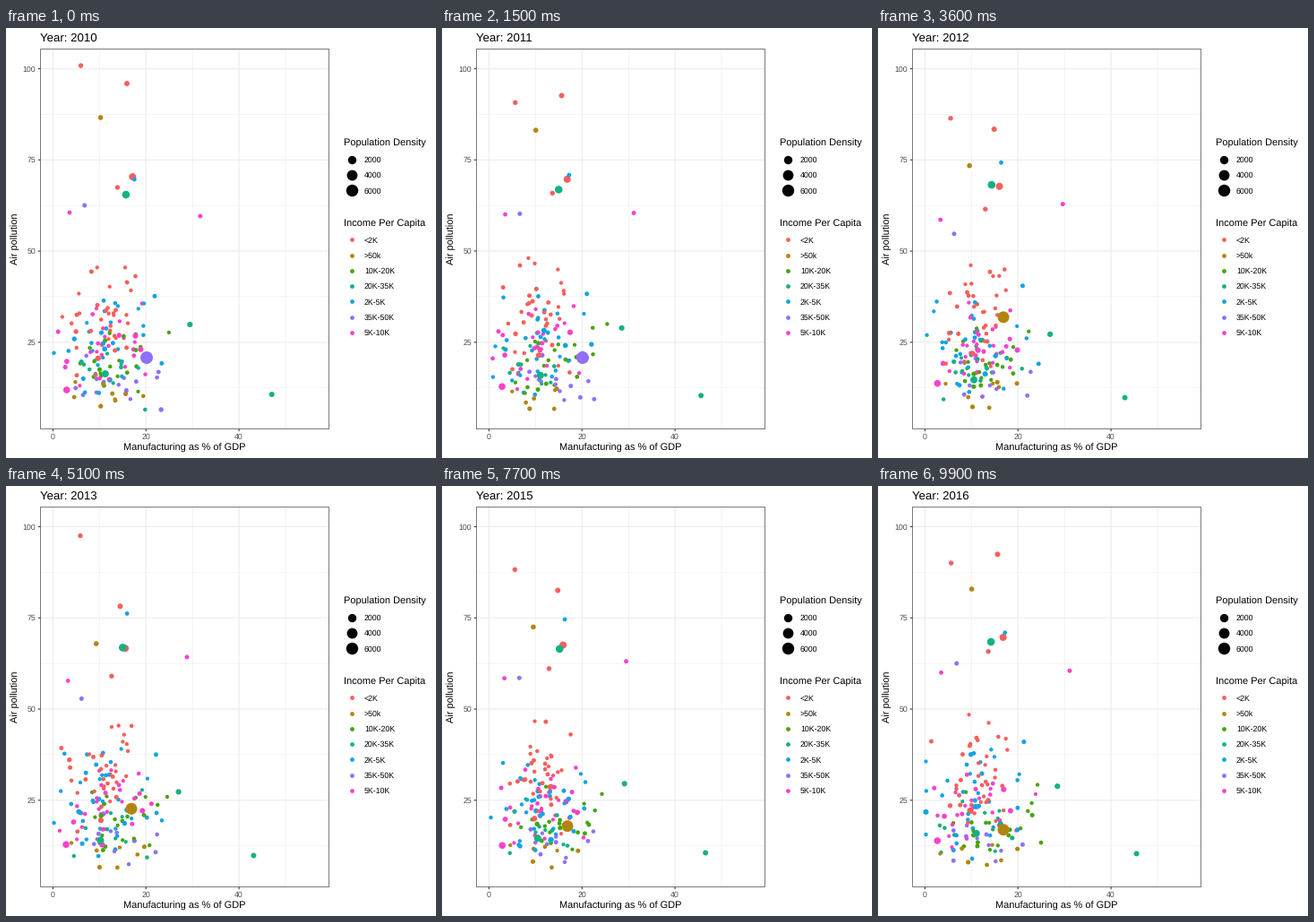
Write a matplotlib script that moves like this. It is 480 px wide and 480 px high and loops after 10000 ms.

```python
import numpy as np
import matplotlib.pyplot as plt
from matplotlib.animation import FuncAnimation
from matplotlib.patches import Rectangle

plt.rcParams.update({"font.family": "Liberation Sans",
                     "text.hinting": "none", "path.snap": False})

SIZE, DPI, FRAMES, YEARS = 480, 72, 100, 7
KEYS = np.round(np.linspace(0, FRAMES - 1, YEARS))
K = np.arange(YEARS)

COLORS = {
    "<2K": "#F4605C", ">50k": "#B38510", "10K-20K": "#43A607",
    "20K-35K": "#14B184", "2K-5K": "#12A3E4", "35K-50K": "#8F70FA",
    "5K-10K": "#F742CB",
}
RED, GOLD, GREEN, TEAL, BLUE, PURPLE, PINK = COLORS.values()

# Standout countries: color, radius, x, y, vertical swing, period in years
STANDOUTS = [
    (RED, 2.7, 82, 78, -36, 3.5), (RED, 3.0, 131, 100, -38, 7),
    (RED, 4.0, 137, 174, -8, 7), (RED, 2.7, 121, 196, -18, 7),
    (TEAL, 4.3, 130, 180, 6, 4), (TEAL, 3.0, 285, 411, -2, 5),
    (TEAL, 3.1, 198, 337, -6, 5), (TEAL, 4.0, 108, 391, -5, 7),
    (PINK, 2.5, 209, 200, 10, 7), (PINK, 3.8, 67, 400, 4, 4),
    (PINK, 2.4, 70, 212, -6, 7), (BLUE, 2.4, 139, 155, 14, 7),
    (GOLD, 2.8, 103, 140, -40, 7), (PURPLE, 2.5, 86, 218, -20, 6),
]

# Crowd per group: color, count, mean x, mean y, spread x, spread y
CROWD = [
    (RED, 39, 102, 323, 22, 36), (GOLD, 9, 117, 411, 25, 9),
    (GREEN, 25, 127, 374, 33, 20), (TEAL, 14, 112, 383, 27, 20),
    (BLUE, 37, 114, 350, 36, 33), (PURPLE, 15, 123, 396, 27, 17),
    (PINK, 31, 113, 354, 34, 23),
]

rng = np.random.default_rng(12)
rows = []  # color, radius, yearly positions, yearly presence


def noise(*shape):
    return np.clip(rng.normal(size=shape), -1.7, 1.7)


def add(color, radius, path, alive=True):
    path = np.broadcast_to(path, (YEARS, 2))
    rows.append((color, radius, path, np.broadcast_to(alive, YEARS)))


for color, n, x, y, sx, sy in CROWD:
    counts = n - rng.integers(0, 4, YEARS)
    for i in range(n):
        home = [x, y] + [sx, sy] * noise(2)
        moved = [x, y] + [sx, sy] * noise(YEARS, 2)
        swap = rng.random((YEARS, 1)) < 0.25
        path = np.where(swap, moved, home) + [3, 6] * noise(YEARS, 2)
        path = np.clip(path, [53.5, 240], [190, 426])
        add(color, min(2.1 + rng.exponential(0.22), 3.1), path, i < counts)
rows = [rows[i] for i in rng.permutation(len(rows))]

for color, radius, x, y, swing, period in STANDOUTS:
    wave = np.cos(2 * np.pi * K / period)
    sway = 0.05 * (x - 52)
    add(color, radius, np.column_stack([x + sway * wave, y + swing * wave]))

# The densest country changes income group between 2011 and 2012
settle = 385 - 70 * np.exp(-(K - 2))
add(PURPLE, 7, [157, 368], K < 2)
add(GOLD, 6.5, np.column_stack([np.full(YEARS, 140), settle]), K >= 2)

colors, radii, paths, alive = zip(*rows)
paths, alive = np.stack(paths, 1), np.stack(alive, 1)

fig = plt.figure(figsize=(SIZE / DPI, SIZE / DPI), dpi=DPI, facecolor="white")
ax = fig.add_axes([0, 0, 1, 1])
ax.set(xlim=(0, SIZE), ylim=(SIZE, 0))
ax.axis("off")

LEFT, RIGHT, TOP, BOTTOM = 38.5, 360.5, 23.5, 447.5


def px(v):
    return 52.4 + 5.193 * v


def py(v):
    return 350.8 - 4.072 * (v - 25)


def line(x, y, color="#EBEBEB", lw=1.07):
    ax.plot(x, y, color=color, lw=lw, zorder=1, solid_capstyle="butt")


def text(x, y, s, size=8.8, color="black", **kw):
    return ax.text(x, y, s, size=size, color=color, **kw)


def dots(x, y, radius, color, **kw):
    return ax.scatter(x, y, s=4 * np.square(radius), c=color,
                      linewidths=0, **kw)


for v in (10, 30, 50):
    line([px(v)] * 2, [TOP, BOTTOM], lw=0.53)
for v in (12.5, 37.5, 62.5, 87.5):
    line([LEFT, RIGHT], [py(v)] * 2, lw=0.53)
for v in (0, 20, 40):
    line([px(v)] * 2, [TOP, BOTTOM])
    line([px(v)] * 2, [BOTTOM, BOTTOM + 2.75], "#333333")
    text(px(v), 459, str(v), color="#4D4D4D", ha="center")
for v in (25, 50, 75, 100):
    line([LEFT, RIGHT], [py(v)] * 2)
    line([LEFT - 2.75, LEFT], [py(v)] * 2, "#333333")
    text(33.3, py(v) + 3.2, str(v), color="#4D4D4D", ha="right")

ax.add_patch(Rectangle((LEFT, TOP), RIGHT - LEFT, BOTTOM - TOP, fill=False,
                       ec="#333333", lw=0.65, zorder=4))

title = text(38, 15, "", 13.2)
text(199.5, 472, "Manufacturing as % of GDP", 11, ha="center")
text(11, 235.5, "Air pollution", 11, rotation=90, ha="center", va="center")


def legend(y, heading, labels, radii, colors):
    text(377, y, heading, 11)
    for i, (label, radius, color) in enumerate(zip(labels, radii, colors)):
        row = y + 14.8 + 17.28 * i
        dots(386, row, radius, color)
        text(400, row + 3.2, label)


legend(132, "Population Density", ["2000", "4000", "6000"],
       [4.7, 5.9, 6.7], ["black"] * 3)
legend(221.5, "Income Per Capita", COLORS, [2.4] * 7, COLORS.values())

points = dots(*paths[0].T, radii, list(colors), zorder=3)


def update(frame):
    w = np.array([np.interp(frame, KEYS, e) for e in np.eye(YEARS)])
    pos = np.tensordot(w, paths, 1)
    pos[~alive[w > 0].all(axis=0)] = np.nan
    points.set_offsets(pos)
    year = 2010 + (YEARS - 1) * frame / (FRAMES - 1)
    title.set_text(f"Year: {round(year)}")
    return points, title


anim = FuncAnimation(fig, update, frames=FRAMES, interval=100,
                     repeat=True, repeat_delay=0)
plt.show()
```
